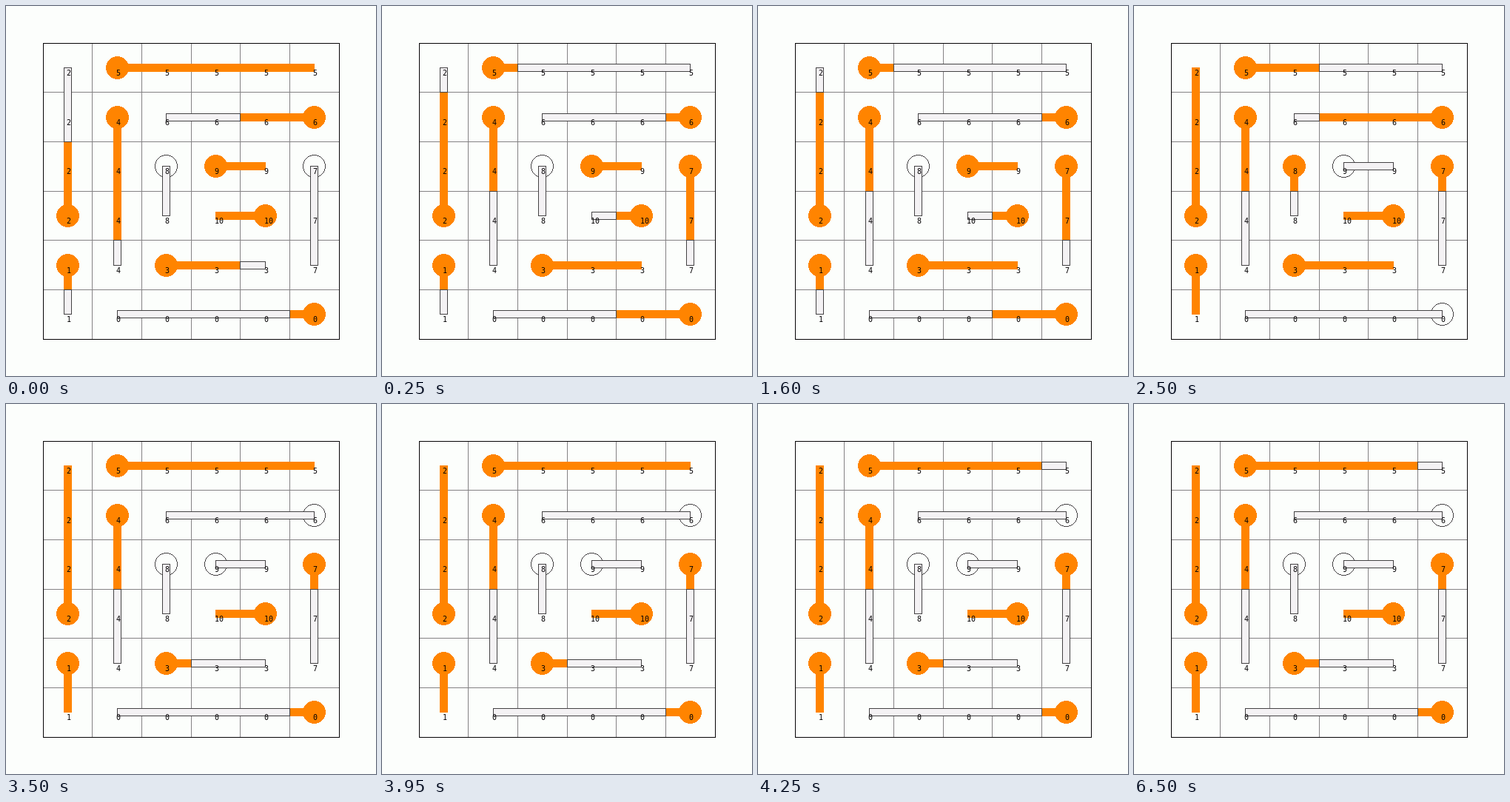
These frames come from a looping animation (500 px wide and 500 px high, 8 s). An HTML page:

```html
<!DOCTYPE html>
<html lang="en">
<head>
<meta charset="utf-8">
<title>Thermometer puzzle</title>
<style>
  html, body { margin: 0; width: 100%; height: 100%; overflow: hidden; background: #fcfefc; }
  svg { display: block; width: 500px; height: 500px; shape-rendering: crispEdges; }
  .grid { stroke: #848284; fill: none; }
  .frame { stroke: #040204; fill: none; }
  .full { fill: #ff8400; stroke: #ff8400; }
  .empty { fill: #f4f2f4; stroke: #444244; }
  circle.empty { fill: #fcfefc; }
  text { font: 10px "DejaVu Sans Mono", monospace; fill: #040204; }
</style>
</head>
<body>
<svg viewBox="0 0 500 500">
  <g transform="translate(.5 .5)">
    <path class="grid" id="grid"/>
    <rect class="frame" x="50" y="50" width="400" height="400"/>
    <g id="tubes"></g>
  </g>
  <g id="labels"></g>
</svg>
<script>
const LOOP = 8000;
const starts = [0, 250, 2500, 3000, 3500, 4250];

// bulb column and row, direction, cell count, filled cells in each scene
const tubes = [
  [5, 5, 'left', 5, '120111'],
  [0, 4, 'down', 2, '112222'],
  [0, 3, 'up', 4, '234444'],
  [2, 4, 'right', 3, '233311'],
  [1, 1, 'down', 4, '322222'],
  [1, 0, 'right', 5, '512254'],
  [5, 1, 'left', 4, '213200'],
  [5, 2, 'down', 3, '021211'],
  [2, 2, 'down', 2, '001000'],
  [3, 2, 'right', 2, '220000'],
  [4, 3, 'left', 2, '212022']
];
const directions = { left: [-1, 0], right: [1, 0], up: [0, -1], down: [0, 1] };

const byId = id => document.getElementById(id);
const edge = n => Math.floor(50 + n * 200 / 3);
const center = n => edge(n + 0.5);

// Bar between two distances, in cells, from the bulb's center
function bar([col, row, dir], from, to, kind) {
  const [dx, dy] = directions[dir];
  const at = d => [center(col + dx * d), center(row + dy * d)];
  const [x1, y1] = at(from), [x2, y2] = at(to);
  const padX = dx ? 0 : 5, padY = dy ? 0 : 5;
  return `<rect class="${kind}" x="${Math.min(x1, x2) - padX}" y="${Math.min(y1, y2) - padY}"
    width="${Math.abs(x2 - x1) + 2 * padX}" height="${Math.abs(y2 - y1) + 2 * padY}"/>`;
}

function drawTube(tube, scene) {
  const [col, row, , cells, levels] = tube;
  const level = +levels[scene];
  const end = cells - 1;
  const split = level === cells ? end : Math.max(0, level - 0.5);
  return `<circle class="${level ? 'full' : 'empty'}" cx="${center(col)}" cy="${center(row)}" r="15"/>`
    + (split > 0 ? bar(tube, 0, split, 'full') : '')
    + (split < end ? bar(tube, split, end, 'empty') : '');
}

function drawLabels([col, row, dir, cells], index) {
  const [dx, dy] = directions[dir];
  return Array.from({ length: cells }, (_, i) =>
    `<text x="${center(col + dx * i) - 1}" y="${center(row + dy * i) + 11}">${index}</text>`).join('');
}

byId('grid').setAttribute('d', [1, 2, 3, 4, 5].map(edge)
  .map(p => `M${p} 50V450M50 ${p}H450`).join(''));
byId('labels').innerHTML = tubes.map(drawLabels).join('');

let shown = -1;
function render(now) {
  const time = now % LOOP;
  const scene = starts.filter(start => start <= time).length - 1;
  if (scene !== shown) {
    byId('tubes').innerHTML = tubes.map(tube => drawTube(tube, scene)).join('');
    shown = scene;
  }
}

let origin;
function tick(now) {
  origin ??= now;
  render(now - origin);
  requestAnimationFrame(tick);
}
render(0);
requestAnimationFrame(tick);
</script>
</body>
</html>
```
